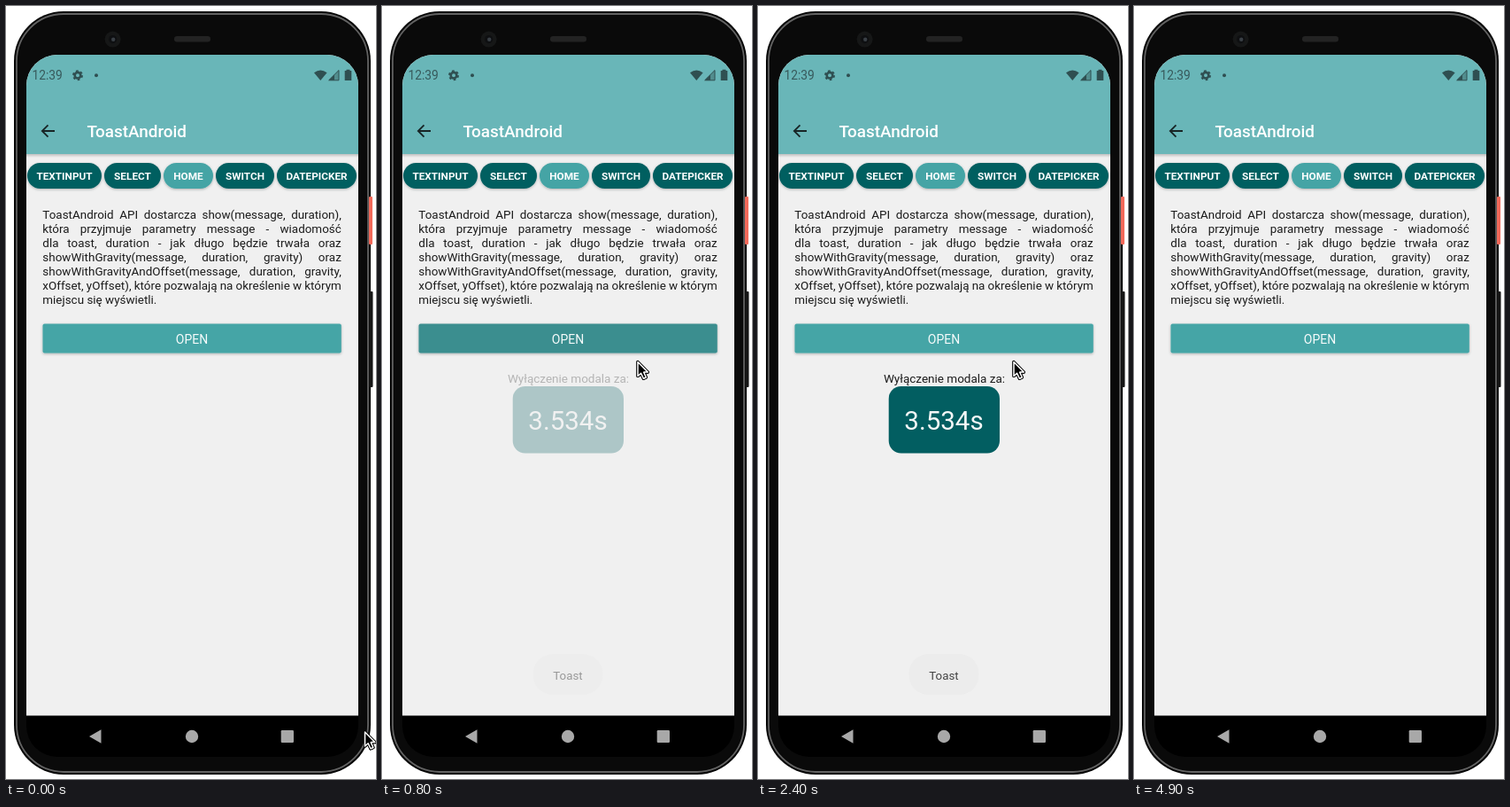
An HTML page for the animation above (5300 ms loop, 418 px wide and 872 px high).

```html
<!DOCTYPE html>
<html lang="pl">
<head>
<meta charset="utf-8">
<title>ToastAndroid</title>
<style>
html, body { margin: 0; width: 100%; height: 100%; overflow: hidden; background: #fff; }
svg { display: block; width: 418px; height: 872px; font-family: Roboto, sans-serif; }
.mid { text-anchor: middle; }
</style>
</head>
<body>
<svg id="stage" viewBox="0 0 418 872" xmlns="http://www.w3.org/2000/svg">
  <defs>
    <clipPath id="screen"><rect x="23" y="55" width="375" height="792" rx="35"/></clipPath>
    <filter id="shade" x="-10%" y="-30%" width="120%" height="170%">
      <feDropShadow dx="0" dy="1" stdDeviation="1.4" flood-color="#000" flood-opacity=".28"/>
    </filter>
    <linearGradient id="under" x1="0" y1="0" x2="0" y2="1">
      <stop offset="0" stop-color="#000" stop-opacity=".2"/>
      <stop offset="1" stop-color="#000" stop-opacity="0"/>
    </linearGradient>
  </defs>

  <!-- phone -->
  <rect x="9" y="6" width="403" height="861" rx="56" fill="#060606"/>
  <rect x="12" y="9" width="397" height="855" rx="53" fill="#090909" stroke="#626262" stroke-width="1.8"/>
  <rect x="14" y="11" width="393" height="851" rx="51" fill="#0a0a0a"/>
  <rect x="410" y="215" width="4" height="54" rx="1" fill="#f2695a"/>
  <rect x="410.5" y="322" width="4" height="108" rx="1" fill="#161616"/>
  <rect x="190" y="34" width="41" height="6.5" rx="3.2" fill="#232323"/>
  <circle cx="120.6" cy="37.6" r="9" fill="#161717"/>
  <circle cx="120.6" cy="37.6" r="4.6" fill="#0e0f11"/>
  <circle cx="121.2" cy="37.8" r="2.2" fill="#393f45"/>

  <g clip-path="url(#screen)">
    <rect x="23" y="55" width="375" height="747" fill="#f0f0f0"/>
    <rect x="23" y="55" width="375" height="112" fill="#69b6b8"/>
    <rect x="23" y="167" width="375" height="4" fill="url(#under)"/>
    <rect x="23" y="800.5" width="375" height="47" fill="#000"/>
  </g>

  <!-- status bar -->
  <g fill="#2f4f51">
    <text x="29.5" y="83.3" font-size="13.8" fill="#37595b">12:39</text>
    <circle cx="81" cy="78.2" r="3.3" fill="none" stroke="#2f4f51" stroke-width="2.6"/>
    <circle cx="81" cy="78.2" r="5" fill="none" stroke="#2f4f51" stroke-width="2" stroke-dasharray="2.6 2.636"/>
    <circle cx="102" cy="78.3" r="2"/>
    <path d="M348 75.3Q355.3 69.5 362.6 75.3L355.3 84Z"/>
    <path d="M376 72.5V83.8H364.7Z" fill-opacity=".4"/>
    <path d="M371 77.5V83.8H364.7Z"/>
    <path d="M376 72.5V83.8H364.7Z" fill="none" stroke="#2f4f51"/>
    <path d="M384.5 71.8h4v1.2h1.8v11h-7.6v-11h1.8z"/>
  </g>

  <path d="M55 141H41M47.5 134.3L40.8 141L47.5 147.7" fill="none" stroke="#182526" stroke-width="1.8"/>
  <text x="91.5" y="148.3" font-size="18.9" font-weight="500" fill="#fff">ToastAndroid</text>

  <g id="tabs"></g>
  <g id="para" font-size="13.45" fill="#1c1c1c"></g>

  <rect id="button" x="41.5" y="358.5" width="337.3" height="33" rx="2" filter="url(#shade)"/>
  <text class="mid" x="210" y="381" font-size="14" fill="#f6fbfb">OPEN</text>

  <g id="modal">
    <text class="mid" x="210.5" y="425.3" font-size="13.5" fill="#1c1c1c">Wyłączenie modala za:</text>
    <rect x="147.7" y="429" width="125.3" height="75.5" rx="14" fill="#025e61"/>
    <text class="mid" x="210" y="478.3" font-size="29.5" fill="#f4f7f7">3.534s</text>
  </g>

  <g id="toast">
    <rect x="170.5" y="731" width="79" height="46" rx="22" fill="#ececec"/>
    <text class="mid" x="210" y="760" font-size="13.3" fill="#444">Toast</text>
  </g>

  <g fill="#a8a8a8">
    <path d="M94 824L107.5 816.3V831.7Z"/>
    <circle cx="210" cy="824" r="7.2"/>
    <rect x="310.7" y="817" width="14.3" height="14" rx="1.2"/>
  </g>

  <g id="cursor" stroke-linejoin="round">
    <path id="arrow" d="M1 1V17L4.6 13.7L7.4 19.8L10.4 18.5L7.7 12.6H12.4Z" stroke="#000" stroke-width="3.2"/>
    <use href="#arrow"/>
    <path d="M1 1V17L4.6 13.7L7.4 19.8L10.4 18.5L7.7 12.6H12.4Z" fill="#000" stroke="#fff" stroke-width="1.5"/>
  </g>
</svg>
<script>
const LOOP = 5300, STEP = 100;
const $ = id => document.getElementById(id);

function add(parent, tag, attrs, text) {
  const el = document.createElementNS("http://www.w3.org/2000/svg", tag);
  for (const k in attrs) el.setAttribute(k, attrs[k]);
  if (text) el.textContent = text;
  parent.appendChild(el);
  return el;
}

[["TEXTINPUT", 24, 108], ["SELECT", 111, 175], ["HOME", 178, 234],
 ["SWITCH", 237, 303], ["DATEPICKER", 306, 396]].forEach(([label, x0, x1]) => {
  add($("tabs"), "rect", { x: x0, y: 177, width: x1 - x0, height: 29, rx: 14.5,
    fill: label === "HOME" ? "#45a4a5" : "#025e61", filter: "url(#shade)" });
  add($("tabs"), "text", { class: "mid", x: (x0 + x1) / 2, y: 196, "font-size": 11.8,
    "font-weight": 700, fill: "#fff" }, label);
});

// Every line but the last is justified through its word spacing.
const lines = [
  "ToastAndroid API dostarcza show(message, duration),",
  "która przyjmuje parametry message - wiadomość",
  "dla toast, duration - jak długo będzie trwała oraz",
  "showWithGravity(message, duration, gravity) oraz",
  "showWithGravityAndOffset(message, duration, gravity,",
  "xOffset, yOffset), które pozwalają na określenie w którym",
  "miejscu się wyświetli."
];
lines.forEach((line, i) => {
  const el = add($("para"), "text", { x: 41.3, y: 239.7 + 16 * i }, line);
  if (i === lines.length - 1) return;
  const gaps = line.split(" ").length - 1;
  el.style.wordSpacing = (337.5 - el.getComputedTextLength()) / gaps + "px";
});

const lerp = (a, b, u) => a + (b - a) * u;
function ease(t, from, to) {
  const u = Math.min(1, Math.max(0, (t - from) / (to - from)));
  return u * u * (3 - 2 * u);
}

function draw(t) {
  const out = 1 - ease(t, 4100, 4700);
  $("modal").setAttribute("opacity", ease(t, 640, 1100) * out);
  $("toast").setAttribute("opacity", ease(t, 600, 1000) * out);

  const press = ease(t, 600, 800) * (1 - ease(t, 800, 1000));
  const idle = [68, 165, 166], held = [59, 142, 143];
  $("button").setAttribute("fill", `rgb(${idle.map((c, i) => Math.round(lerp(c, held[i], press)))})`);

  const go = ease(t, 0, 500), slip = ease(t, 500, 750);
  const x = lerp(404.5, 282.5, go) + 5.5 * slip;
  const y = lerp(818, 377, go) + 23.5 * slip;
  $("cursor").setAttribute("transform", `translate(${x} ${y})`);
  $("cursor").setAttribute("visibility", t < 4700 ? "visible" : "hidden");
}

const start = performance.now();
function tick() {
  const t = (performance.now() - start) % LOOP;
  draw(Math.floor(t / STEP) * STEP);
  requestAnimationFrame(tick);
}
tick();
</script>
</body>
</html>
```
